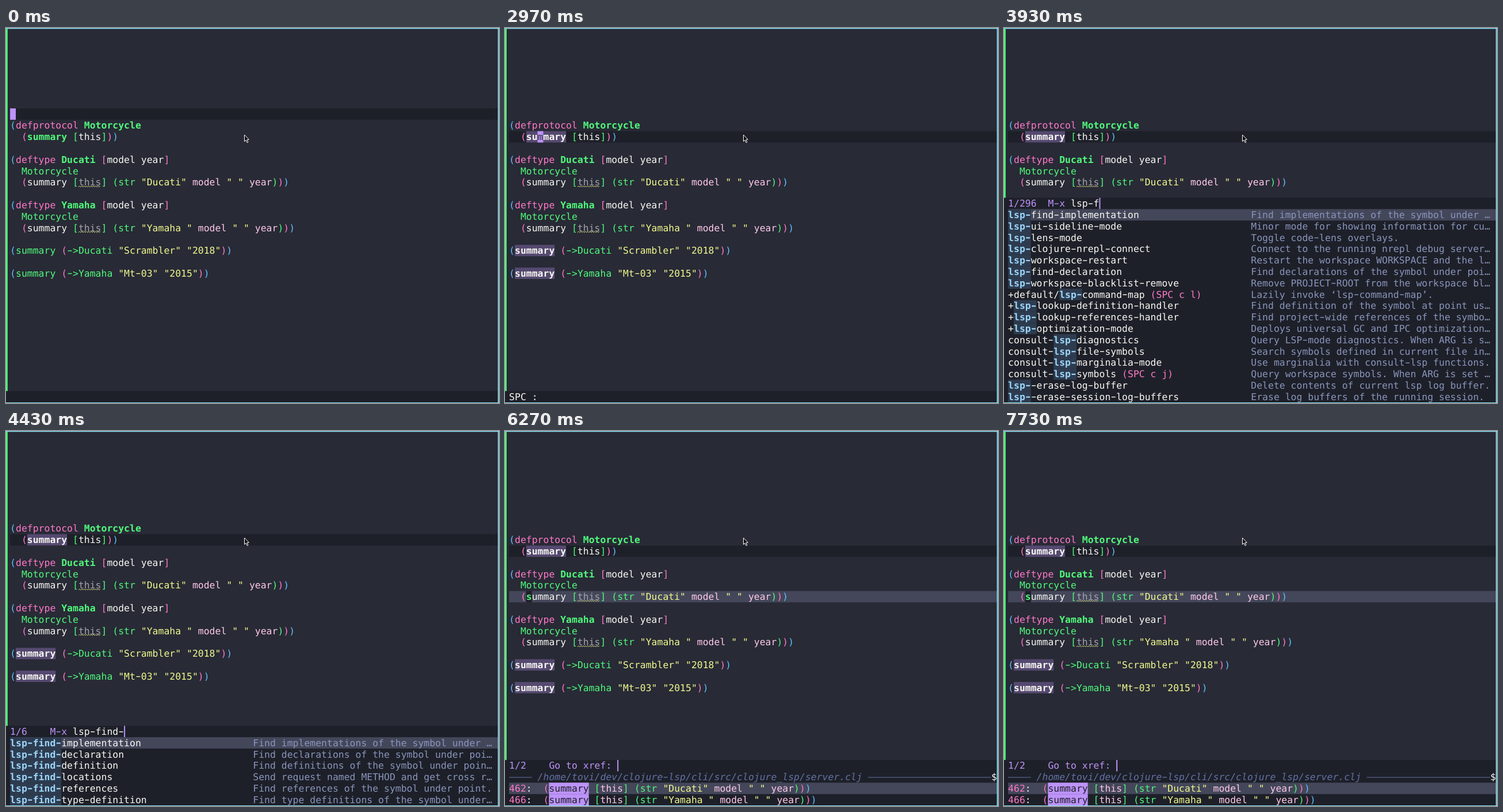
An HTML page with a canvas that plays this animation: 857 px wide and 653 px high, repeating every 8 s.

```html
<!DOCTYPE html>
<html lang="en">
<head>
<meta charset="utf-8">
<title>Find implementation</title>
<style>
  html, body { margin: 0; width: 100%; height: 100%; overflow: hidden; background: #282a36; }
  canvas { display: block; }
</style>
</head>
<body>
<canvas width="857" height="653"></canvas>
<script>
const LOOP = 8000;
const CELL = 9.9, LINE = 19.8, LEFT = 7.1, TOP = 1.4, RIGHT = 855, BOTTOM = 652;
const BASELINE = 15.6, DOC_X = 429.3;
const C = {
  bg: '#282a36', dark: '#1e2029', fg: '#f8f8f2', purple: '#bd93f9', green: '#50fa7b',
  pink: '#ff79c6', pale: '#ffc9e9', yellow: '#f1fa8c', blue: '#61bfff', cyan: '#8be9fd',
  grey: '#a3a4a9', region: '#44475a', symbol: '#554970', doc: '#8995bb', rule: '#6272a4',
  match: '#9dd6fa', matchBg: '#2e3c50'
};
const DEPTH = [C.blue, C.pink, C.green];

// Word marks: ~ keyword, * definition, ^ function, % variable, ! unused, # search match
const code = [
  '(~defprotocol *Motorcycle',
  '  (*summary [this]))',
  '',
  '(~deftype *Ducati [model year]',
  '  ^Motorcycle',
  '  (summary [!this] (^str "Ducati" %model " " %year)))',
  '',
  '(~deftype *Yamaha [model year]',
  '  ^Motorcycle',
  '  (summary [!this] (^str "Yamaha " %model " " %year)))',
  '',
  '(^summary (^->Ducati "Scrambler" "2018"))',
  '',
  '(^summary (^->Yamaha "Mt-03" "2015"))'
];
const MARKS = { '~': C.pink, '*': C.green, '^': C.green, '%': C.pale, '!': C.grey, '#': C.dark };

// name | key binding | description
const commands = `
lsp-find-implementation||Find implementations of the symbol under …
fringe-mode||Set the default appearance of fringes on …
lsp-ui-sideline-mode||Minor mode for showing information for cu…
global-hide-mode-line-mode||Toggle Hide-Mode-Line mode in all buffers.
lsp-lens-mode||Toggle code-lens overlays.
global-git-gutter-mode||Toggle Git-Gutter mode in all buffers.
lsp-clojure-nrepl-connect||Connect to the running nrepl debug server…
lsp-workspace-restart||Restart the workspace WORKSPACE and the l…
lsp-find-declaration||Find declarations of the symbol under poi…
lsp-workspace-blacklist-remove||Remove PROJECT-ROOT from the workspace bl…
+clojure/cider-switch-to-repl-buffer-and-switch-ns|(, r B)|TODO
+clojure/open-cljs-repl||Open a Cider REPL for clojurescript and r…
+clojure/open-repl||Open a Cider REPL for clojure and return …
+company/complete||Bring up the completion popup. If only on…
+company/dabbrev||Invokes ‘company-dabbrev-code’ in prog-mo…
+company/dabbrev-code-previous||TODO
+company/dict-or-keywords||‘company-mode’ completion combining ‘comp…
+default/lsp-command-map|(SPC c l)|Lazily invoke ‘lsp-command-map’.
+lsp-lookup-definition-handler||Find definition of the symbol at point us…
+lsp-lookup-references-handler||Find project-wide references of the symbo…
+lsp-optimization-mode||Deploys universal GC and IPC optimization…
+lsp/switch-client||Switch to another LSP server.
+lsp/uninstall-server||Delete a LSP server from ‘lsp-server-inst…
consult-lsp-diagnostics||Query LSP-mode diagnostics. When ARG is s…
consult-lsp-file-symbols||Search symbols defined in current file in…
consult-lsp-marginalia-mode||Use marginalia with consult-lsp functions.
consult-lsp-symbols|(SPC c j)|Query workspace symbols. When ARG is set …
lsp--erase-log-buffer||Delete contents of current lsp log buffer.
lsp--erase-session-log-buffers||Erase log buffers of the running session.
lsp-find-definition||Find definitions of the symbol under poin…
lsp-find-locations||Send request named METHOD and get cross r…
lsp-find-references||Find references of the symbol under point.
lsp-find-type-definition||Find type definitions of the symbol under…
`.trim().split('\n').map(row => row.split('|'));

// start time, typed text, text the list is filtered by
const typing = [
  [3130, '', ''], [3400, 'l', ''], [3570, 'ls', ''], [3730, 'lsp', 'lsp'],
  [3930, 'lsp-f', 'lsp-'], [4100, 'lsp-fi', 'lsp-fi'], [4430, 'lsp-find-', 'lsp-find-'],
  [4570, 'lsp-find-i', 'lsp-find-'], [4730, 'lsp-find-im', 'lsp-find-im'],
  [4900, 'lsp-find-imp', 'lsp-find-imp'], [5030, 'lsp-find-impl', 'lsp-find-impl'],
  [6100, null, 'lsp-find-impl']
];
const totals = { '': 10125, 'lsp': 300, 'lsp-': 296 };

const ctx = document.querySelector('canvas').getContext('2d');
ctx.textRendering = 'geometricPrecision';
let depth = 0;

function rect(x, y, w, h, color) {
  ctx.fillStyle = color;
  ctx.fillRect(x, y, w, h);
}

const band = (y, color) => rect(LEFT, y, RIGHT - LEFT, LINE, color);

// Sets text on the character grid and returns the x after it.
function put(text, x, y, color, style = '', back) {
  if (back) rect(x, y, text.length * CELL, LINE, back);
  ctx.font = `${style} 16.45px "DejaVu Sans Mono", monospace`;
  ctx.fillStyle = color;
  for (const ch of text) {
    if (ch === '-') {
      const thick = style === 'bold' ? 2.2 : 1.4;
      ctx.fillRect(x + 1.5, y + BASELINE - 5.2 - thick / 2, 6.9, thick);
    } else if (ch !== ' ') {
      ctx.fillText(ch, x, y + BASELINE);
    }
    x += CELL;
  }
  return x;
}

function wave(x, y, width) {
  ctx.beginPath();
  for (let i = 0; i <= width / 2; i++) ctx.lineTo(x + i * 2, y + (i % 2 ? 0 : 2));
  ctx.strokeStyle = '#c9cf78';
  ctx.lineWidth = 1;
  ctx.stroke();
}

function putCode(line, x, y, lit) {
  for (const [, mark, token] of line.matchAll(/([~*^%!#])?("[^"]*"|[()[\]]|[^\s()[\]"]+|\s+)/g)) {
    let color = MARKS[mark] || C.fg, style = mark === '*' ? 'bold' : '', back;
    if (/^[([]/.test(token)) color = DEPTH[depth++];
    else if (/^[)\]]/.test(token)) color = DEPTH[--depth];
    else if (token[0] === '"') color = C.yellow;
    else if (mark === '#') back = C.purple;
    else if (lit && token === 'summary' && mark) [color, style, back] = [C.fg, 'bold', C.symbol];
    const end = put(token, x, y, color, style, back);
    if (mark === '!') wave(x, y + 16.2, end - x);
    x = end;
  }
}

const rowY = row => TOP + row * LINE;

function drawBuffer(t) {
  const second = t >= 7570 && t < 7730;
  const first = t < 6270 ? 8 : second ? 5 : 9;
  const current = t < 800 ? 7 : t < 1000 ? 8 : first + 1;
  const preview = t < 6270 ? -1 : second ? 9 : 5;

  band(rowY(current), C.dark);
  if (preview > 0) band(rowY(first + preview), C.region);
  depth = 0;
  code.forEach((line, i) => putCode(line, LEFT, rowY(first + i), t >= 1830));
  if (preview > 0) put('s', LEFT + 3 * CELL, rowY(first + preview), C.green, 'bold', C.dark);

  if (t < 3130) {
    const [col, ch] = t < 800 ? [0, ' '] : t < 1000 ? [5, 'r'] : [5, 'm'];
    put(ch, LEFT + col * CELL, rowY(current), t < 1830 ? C.dark : C.symbol,
      t < 1000 ? '' : 'bold', C.purple);
  }
}

// Clears the bottom rows and returns the y of the first one.
function openMini(rows) {
  const y = BOTTOM - rows * LINE;
  rect(0, y, RIGHT, BOTTOM - y, C.dark);
  rect(0, TOP, 2.8, y - TOP, C.green);
  return y;
}

function putPrompt(count, label, typed, y) {
  const x = put(`${count.padEnd(6)} ${label} `, LEFT, y, C.purple);
  rect(put(typed, x, y, C.fg), y, 2, LINE, C.purple);
}

function putCommand([name, keys, doc], query, y) {
  const at = name.indexOf(query), to = at + query.length;
  let x = put(name.slice(0, at), LEFT, y, C.fg);
  x = put(name.slice(at, to), x, y, C.match, 'bold', C.matchBg);
  x = put(name.slice(to), x, y, C.fg) + CELL;
  if (keys) x = put(keys, x, y, C.pink) + CELL;
  put(doc, Math.max(x, DOC_X), y, C.doc);
  if (x > DOC_X) put('$', 845.3, y, C.fg);
}

function drawCommands(t) {
  const [, typed, query] = typing.findLast(step => t >= step[0]);
  const found = commands.filter(([name]) => name.includes(query)).slice(0, 17);
  const y = openMini(found.length + 1);
  if (typed !== null) putPrompt('1/' + (totals[query] || found.length), 'M-x', typed, y);
  band(y + LINE, C.region);
  found.forEach((command, i) => putCommand(command, query, y + (i + 1) * LINE));
}

function drawReferences(t) {
  const chosen = t >= 7570 && t < 7730 ? 1 : 0;
  const y = openMini(4), ruleY = y + LINE;
  putPrompt(`${chosen + 1}/2`, 'Go to xref:', '', y);

  const end = put('/home/tovi/dev/clojure-lsp/cli/src/clojure_lsp/server.clj',
    LEFT + 5 * CELL, ruleY, C.rule, 'italic');
  rect(LEFT, ruleY + 10, 4 * CELL, 1, C.rule);
  rect(end + CELL, ruleY + 10, 845 - end - CELL, 1, C.rule);
  put('$', 845.3, ruleY, C.fg);

  [[462, 5], [466, 9]].forEach(([number, index], i) => {
    const lineY = y + (2 + i) * LINE;
    if (i === chosen) band(lineY, C.region);
    put(':', put(String(number), LEFT, lineY, C.pink), lineY, C.fg);
    depth = 1;
    putCode(code[index].trim().replace('!', '%').replace('summary', '#summary'),
      LEFT + 6 * CELL, lineY);
  });
}

function drawEcho(t) {
  const y = openMini(1);
  if (t >= 2700) put(t < 2970 ? 'SPC-' : 'SPC :', LEFT, y, C.fg);
}

function drawPointer() {
  ctx.beginPath();
  for (const [x, y] of [[0, 0], [0, 11.5], [2.6, 9.2], [4.6, 13.6], [6.4, 12.8], [4.5, 8.6], [7.8, 8.2]])
    ctx.lineTo(414.5 + x, 186 + y);
  ctx.closePath();
  ctx.fillStyle = '#101014';
  ctx.fill();
  ctx.strokeStyle = '#fff';
  ctx.lineWidth = 1;
  ctx.stroke();
}

function drawFrame() {
  rect(0, 0, 857, 1.4, C.cyan);
  rect(RIGHT, 0, 1.6, 653, C.cyan);
  rect(0, BOTTOM, 857, 1, C.cyan);
}

function draw(now) {
  const t = now % LOOP;
  rect(0, 0, 857, 653, C.bg);
  drawBuffer(t);
  if (t < 3130) drawEcho(t);
  else if (t < 6270) drawCommands(t);
  else drawReferences(t);
  drawPointer();
  drawFrame();
}

const start = performance.now();
function tick() {
  draw(performance.now() - start);
  requestAnimationFrame(tick);
}
tick();
</script>
</body>
</html>
```
